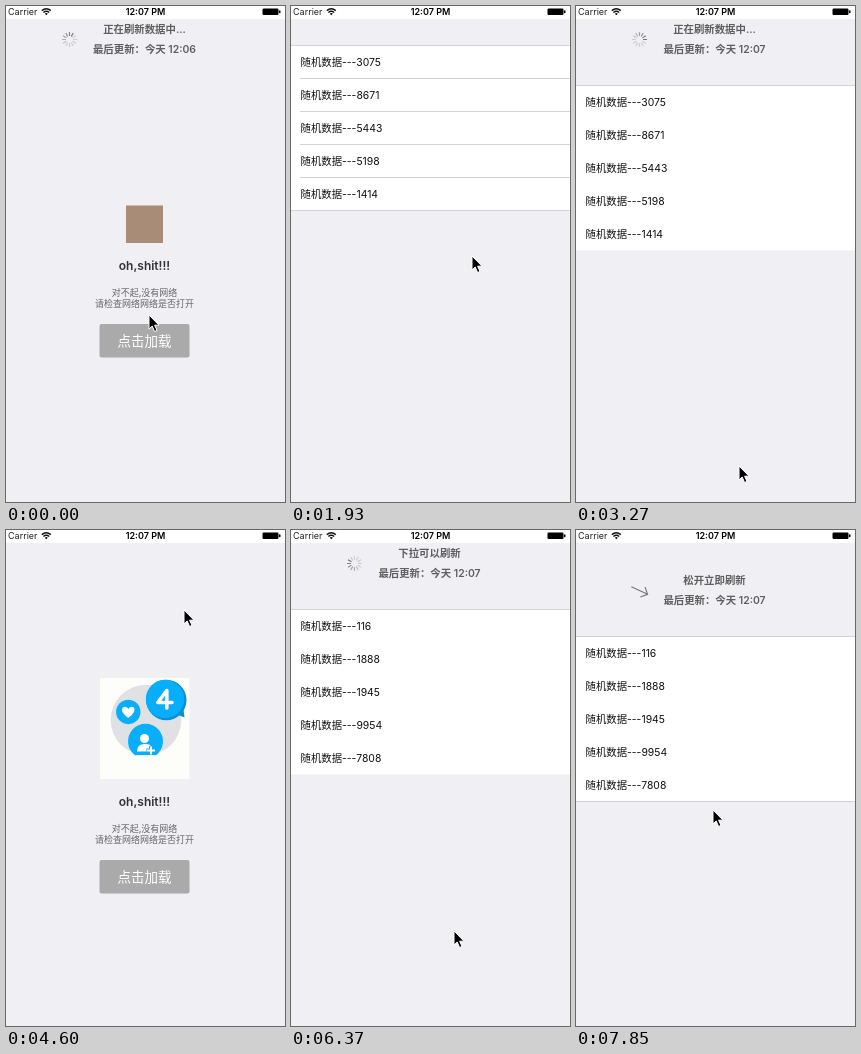
An HTML page that plays this animation: 279 px wide and 496 px high, repeating every 8000 ms.

```html
<!DOCTYPE html>
<html lang="zh">
<head>
<meta charset="utf-8">
<title>Pull to refresh</title>
<style>
  html, body { margin: 0; width: 100%; height: 100%; overflow: hidden; background: #efeff4; }
  svg { display: block; width: 100vw; height: 100vh; }
  text { font-family: Inter, "Noto Sans CJK SC", "Noto Sans CJK", sans-serif; font-size: 10.4px; white-space: pre; }
  .mid { text-anchor: middle; }
  #header text { font-weight: 600; fill: #5f5f5f; }
  #status text { font-size: 9px; }
  .note { font-size: 9px; font-weight: 500; fill: #666; }
  .line { stroke: #d3d3d7; stroke-width: 1; }
</style>
</head>
<body>
<svg viewBox="0 0 279 496">
  <rect width="279" height="496" fill="#efeff4"/>

  <g id="list">
    <rect y="39" width="279" height="165.5" fill="#fff"/>
    <path class="line" d="M0 39.5H279"/>
    <path class="line" id="bottomLine" d="M0 204.5H279"/>
    <path class="line" id="separators" d="M9 72.5H279M9 105.5H279M9 138.5H279M9 171.5H279"/>
    <g id="rows"></g>
  </g>

  <g id="empty">
    <rect id="square" x="120" y="159.5" width="37" height="37.5" fill="#a98c78"/>
    <g id="picture" transform="translate(0 -20)">
      <rect x="94" y="148" width="89.5" height="101" fill="#fdfdfa"/>
      <circle cx="140" cy="190" r="35.3" fill="#dfe1e4"/>
      <path d="M170 184L178.5 187.5L177 176Z" fill="#0a8fd6"/>
      <circle cx="160.3" cy="170" r="20.2" fill="#0a8fd6"/>
      <circle cx="159" cy="169" r="19.2" fill="#06aefc"/>
      <path d="M160.8 178V160.5L151.8 172.5H166" fill="none" stroke="#fff" stroke-width="3.6" stroke-linejoin="round" stroke-linecap="round"/>
      <circle cx="122.3" cy="182" r="12.2" fill="#06aefc"/>
      <path d="M122.3 188C113 181.500 116 176.500 119.300 176.800Q121.500 177 122.300 179Q123.200 177 125.400 176.800C128.700 176.500 131.500 181.500 122.300 188Z" fill="#fff"/>
      <path d="M129 225.300A17.500 17.500 0 1 1 150 225.300Q139.500 224.800 129 225.300Z" fill="#06aefc"/>
      <circle cx="138.5" cy="208.500" r="4.500" fill="#fff"/>
      <path d="M131 221.500Q131 214 138.500 214T144 217V221.500Z" fill="#fff"/>
      <path d="M145 216V225M140.500 220.500H149.500" stroke="#06aefc" stroke-width="4"/>
      <path d="M145 216.500V224.500M141 220.500H149" stroke="#fff" stroke-width="2"/>
    </g>
    <g id="message">
      <text class="mid" x="138.5" y="-87.7" style="font-size:12px;font-weight:600" fill="#333">oh,shit!!!</text>
      <text class="mid note" x="138.5" y="-61.2">对不起,没有网络</text>
      <text class="mid note" x="138.5" y="-50.6">请检查网络网络是否打开</text>
      <rect x="93.500" y="-33.500" width="90" height="33.500" rx="2" fill="#aaa"/>
      <text class="mid" x="138.5" y="-11.7" style="font-size:13.5px" fill="#fff">点击加载</text>
    </g>
  </g>

  <g id="header">
    <text class="mid" id="hint" x="138.5" y="-13"></text>
    <text class="mid" id="updated" x="138.5" y="7.300"></text>
    <g transform="translate(63.500 -6.500)">
      <g id="spinner" stroke="#666" stroke-width="1.2" stroke-linecap="round"></g>
      <path id="arrow" d="M-9 0H9M3.500 -5.500L9 0L3.500 5.500" fill="none" stroke="#777" stroke-width="1.100"/>
    </g>
  </g>

  <g id="status">
    <rect width="279" height="13" fill="#fff"/>
    <text x="2" y="9.2" fill="#222">Carrier</text>
    <g fill="none" stroke="#111" stroke-width="1.400">
      <path d="M35.800 4.600Q40.300 0.800 44.800 4.600M37.400 6.500Q40.300 4.100 43.200 6.500"/>
      <path d="M40.300 9.300L38.800 7.700Q40.300 6.500 41.800 7.700Z" fill="#111" stroke="none"/>
    </g>
    <text class="mid" x="139.5" y="9.2" font-weight="600">12:07 PM</text>
    <rect x="256.500" y="2.500" width="16" height="6.500" rx="1.200"/>
    <rect x="273" y="4.300" width="1.500" height="3" rx=".7"/>
  </g>

  <path id="cursor" d="M0 0V14L3.200 11L5.600 16.500L8 15.400L5.600 10.200H10Z" fill="#000" stroke="#fff" stroke-width="1"/>
</svg>
<script>
const LOOP = 8000, STEP = LOOP / 54, REST = 40;
const $ = id => document.getElementById(id);
const clamp = x => Math.max(0, Math.min(1, x));

// How far the table is pulled down: [ms, px]
const pullKeys = [[0, 40], [700, 40], [1100, 0], [1960, 0], [2140, 40], [2380, 96], [2530, 96], [2930, 40],
  [3700, 40], [4100, 0], [4530, 0], [4593, 20], [4900, 139], [5000, 139], [5388, 40],
  [6370, 40], [6770, 0], [7480, 0], [7762, 40], [7852, 67]];

// Pointer tip: [ms, x, y]
const cursorKeys = [[0, 143, 309], [600, 143, 309], [1500, 170, 262], [1926, 181, 250], [1980, 181, 250],
  [2370, 166, 467], [2700, 166, 467], [3259, 163, 460], [3640, 163, 460], [4300, 178, 45], [4530, 178, 42],
  [4593, 178, 80], [4900, 165, 396], [5185, 163, 410], [5900, 163, 401], [6400, 163, 401],
  [7150, 140, 140], [7480, 140, 138], [7852, 137, 280]];

// Each refresh: start, data arrival, end of collapse
const refreshes = [[-600, 600, 1100], [2500, 3640, 4100], [5000, 6230, 6770]];
const armTimes = [2140, 4680, 7762];
const firstRows = [3075, 8671, 5443, 5198, 1414];
const secondRows = [116, 1888, 1945, 9954, 7808];

function sample(keys, t) {
  const next = keys.findIndex(k => k[0] > t);
  if (next < 0) return keys[keys.length - 1].slice(1);
  const a = keys[next - 1], b = keys[next];
  const p = (t - a[0]) / (b[0] - a[0]), e = p * p * (3 - 2 * p);
  return a.slice(1).map((v, i) => v + (b[i + 1] - v) * e);
}

const move = (id, x, y) => $(id).setAttribute("transform", `translate(${x} ${y})`);
const show = (id, on) => $(id).style.display = on ? "" : "none";
const write = (id, text) => { if ($(id).textContent !== text) $(id).textContent = text; };

$("rows").innerHTML = firstRows.map((_, i) => `<text id="row${i}" x="9.500" y="${60 + 33 * i}" fill="#111"></text>`).join("");
$("spinner").innerHTML = Array.from({ length: 12 }, (_, i) => `<path d="M0 -4V-7" transform="rotate(${i * 30})"/>`).join("");

function drawHeader(t, pull) {
  const active = refreshes.find(([start, , end]) => t >= start && t < end);
  const loading = active && t < active[1];
  move("header", 0, pull);
  $("header").style.opacity = clamp((pull - 20) / 20);
  write("hint", loading ? "正在刷新数据中..." : pull > REST ? "松开立即刷新" : "下拉可以刷新");
  write("updated", "最后更新：今天 12:0" + (t < 600 ? 6 : 7));
  show("spinner", active);
  show("arrow", !active);
  if (active) {
    const head = Math.floor((t - active[0]) * 0.012) + 6;
    [...$("spinner").children].forEach((spoke, i) => {
      const age = (head - i + 24 * 12) % 12;
      spoke.style.opacity = Math.max(0.25, 0.9 - age * 0.11);
    });
  } else {
    const armed = armTimes.filter(a => a <= t).pop();
    const turn = pull > REST && armed ? clamp((t - armed) / 250) : 0;
    $("arrow").setAttribute("transform", `rotate(${90 - 180 * turn})`);
  }
}

function draw(t) {
  const [pull] = sample(pullKeys, t);
  const firstEmpty = t < 600, secondEmpty = t >= 3640 && t < 6230;
  const isEmpty = firstEmpty || secondEmpty;

  show("list", !isEmpty);
  show("empty", isEmpty);
  move("list", 0, pull);
  move("empty", 0, pull);
  show("separators", pull < 1);
  show("bottomLine", Math.abs(pull - REST) > 1);
  (t < 3640 ? firstRows : secondRows).forEach((n, i) => write("row" + i, "随机数据---" + n));

  show("square", firstEmpty);
  show("picture", secondEmpty);
  move("message", 0, firstEmpty ? 311.5 : 343.5);

  drawHeader(t, pull);
  move("cursor", ...sample(cursorKeys, t));
}

function tick() {
  const t = performance.now() % LOOP;
  draw(Math.min(53, Math.floor(t / STEP + 0.1)) * STEP);
  requestAnimationFrame(tick);
}
tick();
</script>
</body>
</html>
```
